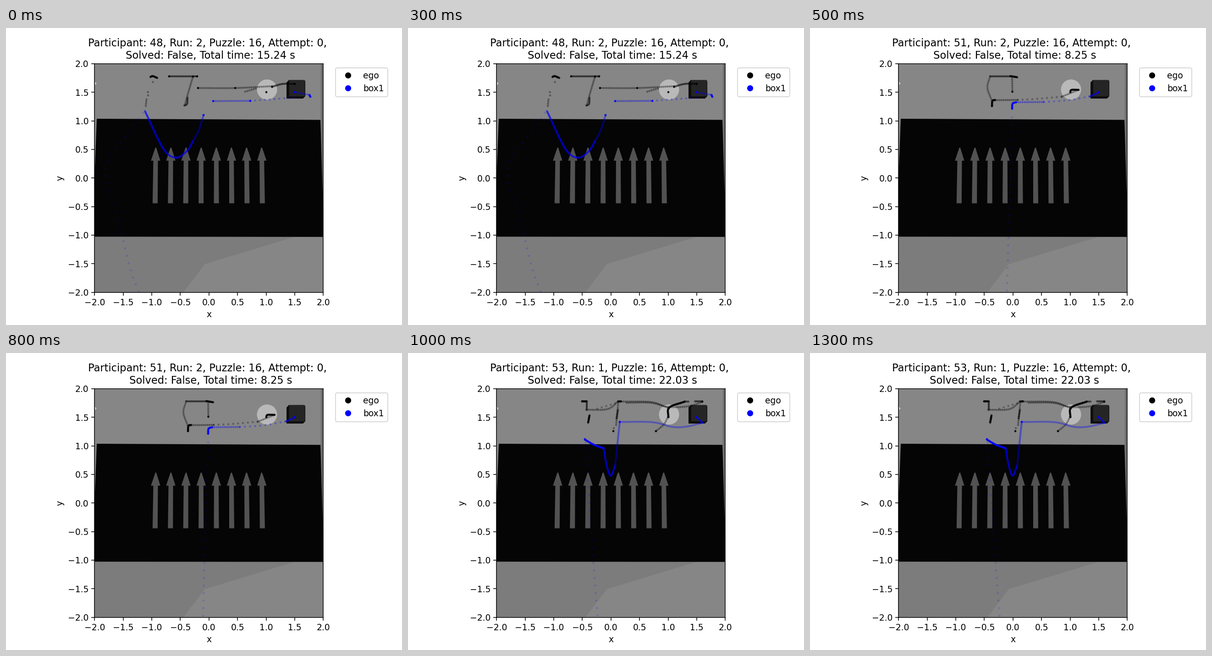
Recreate the animation shown at these times as a matplotlib script. Size 864 px wide and 648 px high, loop 1.5 s.

```python
import numpy as np
import matplotlib.pyplot as plt
from matplotlib.animation import FuncAnimation
from matplotlib.lines import Line2D
from matplotlib.patches import Circle, Polygon

W, H, DPI = 864, 648, 135
LEFT, TOP, SIDE = 193.3, 77.8, 498.96

plt.rcParams["font.family"] = "DejaVu Sans"
fig, ax = plt.subplots(figsize=(W / DPI, H / DPI), dpi=DPI)


def to_data(points):
    """Stage pixels (y down) to plot units."""
    p = np.asarray(points, float)
    x = (p[:, 0] - LEFT) / SIDE * 4 - 2
    y = 2 - (p[:, 1] - TOP) / SIDE * 4
    return np.column_stack([x, y])


def shape(color, *points):
    ax.add_patch(Polygon(to_data(points), fc=color, ec="none", lw=0, zorder=1))


def draw_arrow(tip):
    lean = (tip - 442) * 0.013
    half = [(1, 261, 0), (10.2, 289.5, 0.25), (5, 289.5, 0.25), (5.5, 382.5, 1)]
    right = [(tip + lean * f + w, y) for w, y, f in half]
    left = [(tip + lean * f - w, y) for w, y, f in half]
    shape("#525252", *right, *left[::-1])


def draw_scene():
    ax.set_facecolor("#868686")
    shape("#6e6e6e", (686.5, 77), (693, 77), (693, 456), (686, 456))
    shape("#7c7c7c", (193, 455), (632, 455), (434, 515), (386, 578), (193, 578))
    shape("#050505", (198, 198), (686, 200.5), (691.5, 380), (693, 455.8),
          (193, 455.3), (193, 330))
    for k in range(8):
        draw_arrow(326.8 + 33 * k)
    center = to_data([(569.5, 134.3)])[0]
    ax.add_patch(Circle(center, 22 / SIDE * 4, fc="#b9b9b9", ec="none", zorder=1))
    shape("#0e0e0e", (612, 119), (617, 113.5), (651, 113.5), (653, 116),
          (653, 149), (648, 154), (612, 154))
    shape("#252525", (617.5, 114), (652, 114), (652, 149), (617.5, 149))
    mark = to_data([(194.5, 119), (196.5, 121), (194.5, 123)])
    ax.plot(*mark.T, color="white", lw=0.6, zorder=1)


def smooth(points, steps=30):
    """Catmull-Rom curve through the points."""
    p = np.asarray(points, float)
    if len(p) < 3:
        return p
    p = np.vstack([2 * p[0] - p[1], p, 2 * p[-1] - p[-2]])
    t = np.linspace(0, 1, steps, endpoint=False)[:, None]
    parts = []
    for a, b, c, d in zip(p, p[1:], p[2:], p[3:]):
        parts.append(0.5 * (2 * b + (c - a) * t + (2 * a - 5 * b + 4 * c - d) * t**2
                            + (3 * b - a - 3 * c + d) * t**3))
    return np.vstack(parts + [p[-2:-1]])


def dots_along(points, gap):
    """Dots spaced evenly along the curve; no gap keeps the points alone."""
    if gap is None:
        return np.asarray(points, float)
    p = smooth(points)
    dist = np.r_[0, np.cumsum(np.hypot(*np.diff(p, axis=0).T))]
    at = np.linspace(0, dist[-1], max(2, round(dist[-1] / gap) + 1))
    return np.column_stack([np.interp(at, dist, p[:, i]) for i in (0, 1)])


EGO, BOX = (0, 0, 0), (0, 0, 1)

# Dot gap in pixels and opacity.
STYLES = dict(
    knot=(None, 0.9), spot=(None, 0.35), solid=(1.2, 0.6), dense=(2.4, 0.42),
    chain=(3.2, 0.28), dots=(4.5, 0.36), loose=(11, 0.28),
    line=(1, 0.25), thin=(1.6, 0.18), fall=(16.5, 0.15),
)

# Strokes: a style, then points in stage pixels.
ego_a = [
    ("dense", (581, 128), (604, 122), (630, 122)),
    ("dots", (419, 131), (500, 131), (580, 127)),
    ("dots", (522, 139), (545, 132)),
    ("dense", (356, 105.5), (417, 105.5)),
    ("dots", (408, 106), (397, 143), (390, 169)),
    ("dense", (396, 152), (395, 166), (389, 169)),
    ("solid", (315, 107), (320, 105), (330, 109)),
    ("dots", (306.5, 156), (305, 170)),
    ("spot", (320.5, 118), (309.5, 140), (310, 147)),
    ("knot", (568, 140), (580.5, 128.5), (630, 122), (419, 131), (500, 131),
     (356, 105.5), (417, 105.5), (408, 106)),
]
box_a = [
    ("solid", (664, 150), (662, 146)),
    ("chain", (662, 146), (630, 140)),
    ("loose", (628, 152), (533, 159)),
    ("dots", (533, 159), (452, 159.5)),
    ("thin", (431, 190), (421, 222), (408, 247)),
    ("line", (408, 247), (395, 268), (371, 283), (343, 263), (303, 181)),
    ("fall", (299, 185), (264, 233), (217, 307), (244, 415), (270, 521),
     (289, 575)),
    ("knot", (664, 150), (630, 140), (533, 159), (452, 159.5), (431, 190)),
]
ego_b = [
    ("solid", (568, 138), (571, 135), (586, 135)),
    ("dots", (586, 135), (549, 150)),
    ("loose", (549, 150), (490, 155), (453, 157)),
    ("dots", (453, 157), (400, 157.5)),
    ("solid", (404, 157), (398, 159), (397, 170)),
    ("dots", (396, 157), (387, 130), (393, 105.5)),
    ("dense", (393, 105.5), (437, 105.5)),
    ("solid", (437, 105), (452, 107.5)),
    ("dots", (441, 107), (441.5, 139)),
    ("knot", (568, 140), (397, 170.5), (441.5, 139)),
]
box_b = [
    ("dense", (630, 141), (610, 149.5)),
    ("loose", (610, 149.5), (560, 158), (510, 161.5)),
    ("dots", (510, 161.5), (450, 162)),
    ("solid", (450, 162), (442, 165), (441, 176)),
    ("fall", (441, 195), (433, 455), (430, 573)),
    ("knot", (630, 140), (441, 176)),
]
ego_c = [
    ("solid", (568, 140), (570, 119), (604, 106)),
    ("dense", (604, 106), (612, 106)),
    ("dense", (626, 105.5), (642, 105.5)),
    ("dots", (642, 107), (610, 116.5), (565, 117.5), (530, 107), (465, 106)),
    ("dots", (570, 120), (532, 109), (477, 108.5)),
    ("solid", (458, 106), (465, 105.5)),
    ("dots", (459, 106), (454, 157)),
    ("dense", (458, 124), (455, 143)),
    ("dots", (458, 106), (435, 122.5), (389, 124)),
    ("loose", (413, 121.5), (452, 110)),
    ("dense", (390, 124), (390, 106)),
    ("solid", (390, 105.5), (380, 105.5)),
    ("solid", (396, 136), (393, 152)),
    ("dots", (541, 170.5), (558, 156), (567, 140)),
    ("spot", (449, 164)),
    ("knot", (568, 140), (642, 106), (380, 105.5), (448, 170.5), (541, 170.5)),
]
box_c = [
    ("dense", (630, 140), (642, 152)),
    ("chain", (641, 153), (605, 161), (575, 161), (533, 151), (462, 150.5)),
    ("thin", (462, 150), (452, 245)),
    ("line", (452, 245), (442, 268), (433, 243), (427, 208)),
    ("solid", (427, 208), (405, 200), (386, 189)),
    ("fall", (387.5, 195), (404, 445), (413.5, 573)),
    ("knot", (630, 140), (641, 152), (462, 150.5), (386, 188)),
]

RUNS = [
    (48, 2, "15.24", ego_a, box_a),
    (51, 2, "8.25", ego_b, box_b),
    (53, 1, "22.03", ego_c, box_c),
]


def build_trails(ego, box):
    """All dots of one run with their colours."""
    spots, colors = [], []
    for color, strokes in ((EGO, ego), (BOX, box)):
        for style, *points in strokes:
            gap, alpha = STYLES[style]
            dots = dots_along(points, gap)
            spots.append(dots)
            colors += [(*color, alpha)] * len(dots)
    return to_data(np.vstack(spots)), colors


draw_scene()
ax.set_aspect("equal")
ax.set_xlim(-2, 2)
ax.set_ylim(-2, 2)
ticks = np.arange(-2, 2.1, 0.5)
ax.set_xticks(ticks)
ax.set_yticks(ticks)
ax.set_xlabel("x")
ax.set_ylabel("y")
handles = [Line2D([], [], ls="none", marker="o", color=c, label=name)
           for c, name in ((EGO, "ego"), (BOX, "box1"))]
ax.legend(handles=handles, loc="upper right", bbox_to_anchor=(1.3, 1))
title = ax.set_title("")
trails = ax.scatter([], [], s=6, linewidths=0, zorder=2)


def update(i):
    person, run, seconds, ego, box = RUNS[i % len(RUNS)]
    title.set_text(f"Participant: {person}, Run: {run}, Puzzle: 16, Attempt: 0, \n"
                   f" Solved: False, Total time: {seconds} s")
    spots, colors = build_trails(ego, box)
    trails.set_offsets(spots)
    trails.set_facecolors(colors)
    return title, trails


anim = FuncAnimation(fig, update, frames=len(RUNS), interval=500,
                     repeat=True, repeat_delay=0, blit=False)
plt.show()
```
